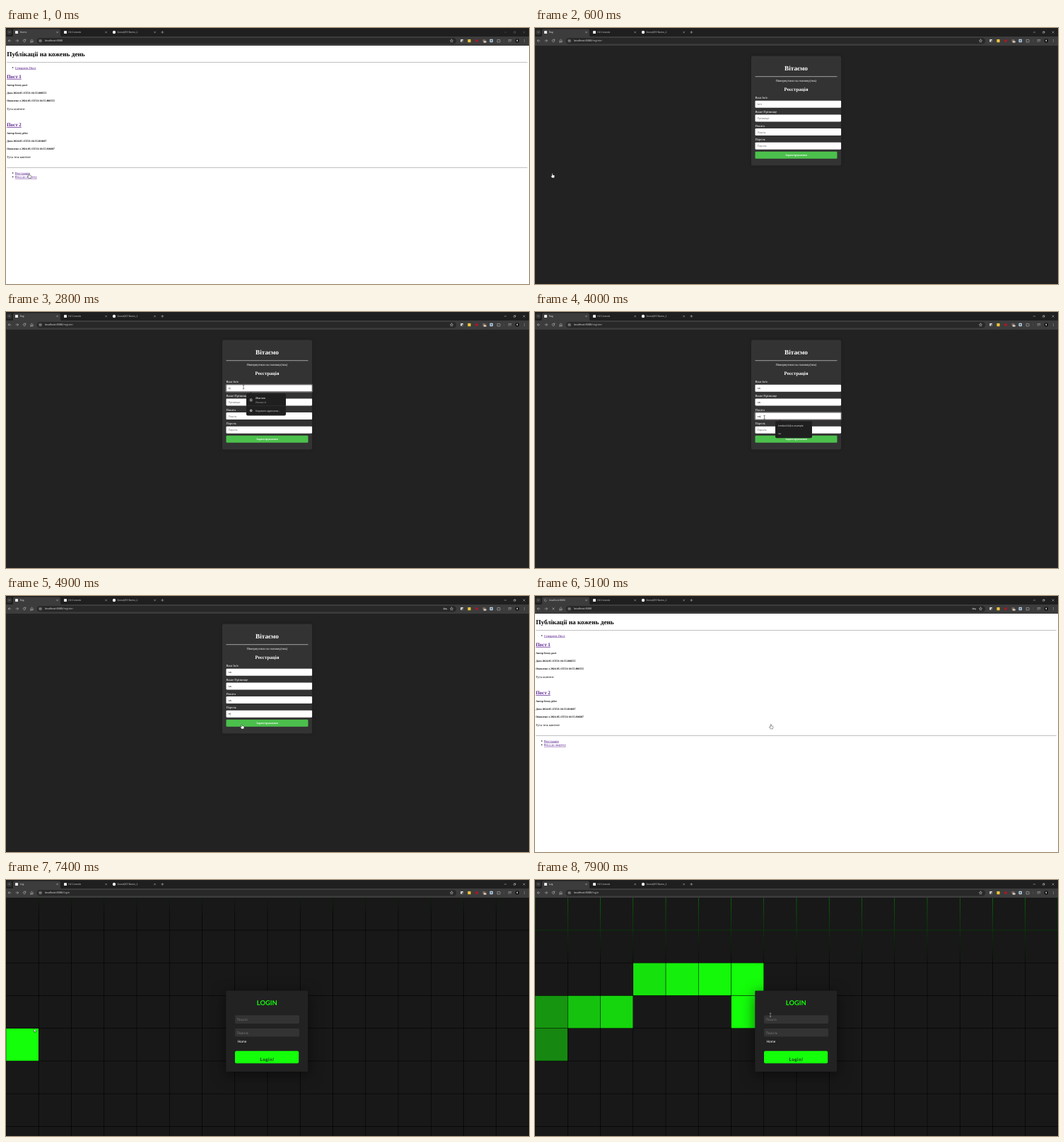
These frames come from a looping animation (740x362 px, 8 s). An HTML page:

```html
<!DOCTYPE html>
<html lang="uk">
<head>
<meta charset="utf-8">
<title>Blog demo</title>
<style>
html, body { margin: 0; width: 100%; height: 100%; overflow: hidden; background: #222; }
svg { display: block; width: 100vw; height: 100vh; text-rendering: geometricPrecision; }
text { white-space: pre; }
.serif { font-family: "Liberation Serif", "Times New Roman", serif; }
.sans { font-family: "Liberation Sans", Arial, sans-serif; }
.ui { font-family: "Open Sans", "Noto Sans", sans-serif; }
.lato { font-family: Lato, "Open Sans", sans-serif; }
.b { font-weight: 700; }
.u { text-decoration: underline; }
.mid { text-anchor: middle; }
.card { filter: drop-shadow(0 4.3px 10px rgba(0, 0, 0, .55)); }
.line { fill: none; stroke-linecap: round; stroke-linejoin: round; }
</style>
</head>
<body>
<svg id="stage" viewBox="0 0 740 362" preserveAspectRatio="none"></svg>
<script>
const LOOP = 8000, STEP = 100, TOP = 25, CELL = 46.25, GAP = 0.58;
const LOGIN_AT = 7200, HOME_AT = 5100, REG_AT = 500;
const GREEN = [20, 255, 10], DARK = [24, 24, 24];
const GREEN_CSS = `rgb(${GREEN})`;

// Markup helpers
const text = (x, y, size, cls, fill, str, more = '') =>
  `<text x="${x}" y="${y}" font-size="${size}" class="${cls}" fill="${fill}" ${more}>${str}</text>`;
const rect = (x, y, w, h, fill, r = 0, more = '') =>
  `<rect x="${x}" y="${y}" width="${w}" height="${h}" rx="${r}" fill="${fill}" ${more}/>`;
const dot = (x, y, r, fill, more = '') => `<circle cx="${x}" cy="${y}" r="${r}" fill="${fill}" ${more}/>`;
const line = (d, color = '#ccc', w = 0.5, more = '') =>
  `<path class="line" d="${d}" stroke="${color}" stroke-width="${w}" ${more}/>`;
const group = (id, body, more = '') => `<g id="${id}" ${more}>${body}</g>`;
const cross = (x, y, r, color, w) =>
  line(`M${x - r} ${y - r}l${2 * r} ${2 * r}m0 ${-2 * r}l${-2 * r} ${2 * r}`, color, w);

function post(y, title, author, stamp, body) {
  const small = (dy, s) => text(1.2, y + dy, 3.84, 'serif b', '#000', s);
  return text(1.2, y, 6.94, 'serif b u', '#551a8b', title)
    + small(11.2, `Автор блогу ${author}`)
    + small(22.2, `Дата ${stamp}`)
    + small(33.1, `Оновлено о ${stamp}`)
    + text(1.2, y + 44.7, 4.625, 'serif', '#000', body);
}

function homePage() {
  const item = (y, s) => dot(9.6, y - 1.5, 0.75, '#000') + text(12.8, y, 4.625, 'serif u', '#551a8b', s);
  const rule = y => rect(1.2, y, 736.5, 0.55, '#8c8c8c');
  return rect(0, TOP, 740, 337, '#fff')
    + text(1.2, 39.8, 9.25, 'serif b', '#000', 'Публікації на кожень день')
    + rule(48.3) + item(57.6, 'Створити Пост')
    + post(70.9, 'Пост 1', 'poet', '2024-05-15T21:16:55.806555', 'Тута контент')
    + post(139, 'Пост 2', 'pilot', '2024-05-15T21:16:55.816607', 'Тута теж контент')
    + rule(197.2) + item(206.6, 'Реєстрація') + item(211.9, 'Вхід до акаунту');
}

const FIELDS = [
  { y: 102.8, label: "Ваш Ім'я", hint: "Ім'я" },
  { y: 122.4, label: 'Ваше Прізвище', hint: 'Прізвище' },
  { y: 142.1, label: 'Пошта', hint: 'Пошта' },
  { y: 161.7, label: 'Пароль', hint: 'Пароль' }
];

function registerPage() {
  const fields = FIELDS.map((f, i) =>
    text(311.5, f.y - 2.6, 4.625, 'serif', '#fff', f.label)
    + rect(311.5, f.y, 121.6, 10, '#fff', 1.1)
    + text(314.4, f.y + 6.4, 3.85, 'sans', '#757575', f.hint, `id="in${i}"`)).join('');
  const ring = rect(310.9, 0, 122.8, 10.8, 'none', 1.4, 'stroke="#d8d0d0" stroke-width=".5"')
    + rect(311.4, 0.5, 121.8, 9.8, 'none', 1.1, 'stroke="#2a2424" stroke-width=".55"');
  return rect(0, TOP, 740, 337, '#222')
    + rect(306, 39.6, 127.2, 155, '#333', 2.3, 'style="filter:drop-shadow(0 0 2px rgba(0,0,0,.2))"')
    + text(369.5, 60, 9.25, 'serif b mid', '#fff', 'Вітаємо')
    + rect(311.5, 68.5, 116, 0.6, '#e4e4e4')
    + text(369.5, 75.5, 4.625, 'serif mid', '#fff', 'Повернутися на головну(тик)')
    + text(369.5, 88.7, 6.94, 'serif b mid', '#fff', 'Реєстрація')
    + fields
    + rect(311.5, 174.8, 116, 10, '#4cc04c', 1.2)
    + text(369.5, 181.2, 4.05, 'serif b mid', '#fff', 'Зареєструватися')
    + group('ring', ring) + group('namePop', namePopup()) + group('mailPop', mailPopup());
}

function popup(y, w, h) {
  return `<path d="M344.6 ${y + 0.2}l2-2 2 2z" fill="#1f1f1f"/>` + rect(340, y, w, h, '#1f1f1f', 2);
}

function namePopup() {
  return popup(115.2, 56, 31.2)
    + dot(346.7, 124.4, 1.7, 'none', 'stroke="#ddd" stroke-width=".55"')
    + dot(346.7, 123.9, 0.6, '#ddd') + line('M345.6 125.5q1.1-.9 2.2 0', '#ddd', 0.5)
    + text(353, 122.9, 3.5, 'ui', '#f2f2f2', 'Zhorven', 'font-weight="600"')
    + text(353, 128.7, 3.2, 'ui', '#c4c4c4', 'Zhorven K')
    + rect(340, 132.6, 56, 0.3, '#484848')
    + dot(346.7, 139.4, 1.4, 'none', 'stroke="#ddd" stroke-width=".9"') + dot(346.7, 139.4, 0.5, '#ddd')
    + text(353, 140.7, 3.4, 'ui', '#dcdcdc', 'Керувати адресами...');
}

function mailPopup() {
  return popup(154.4, 52, 23.8)
    + text(343.8, 162.3, 3.35, 'ui', '#f2f2f2', 'lomiket24@zx.example')
    + text(343.8, 172.8, 3.35, 'ui', '#f2f2f2', 'ча');
}

function loginPage() {
  let cells = '';
  for (let r = 0; r < 8; r++)
    for (let c = 0; c < 16; c++)
      cells += rect(c * CELL + GAP / 2, TOP + r * CELL, CELL - GAP, CELL - GAP, `rgb(${DARK})`, 0, `id="c${c}_${r}"`);
  const input = (y, hint) => rect(324, y, 91, 11.6, '#333', 1.6) + text(326.6, y + 7.5, 4.9, 'lato', '#777', hint);
  const glow = `<linearGradient id="glow" x1="0" y1="0" x2="0" y2="1"><stop offset="0"/>`
    + `<stop offset=".5" stop-color="#0f0"/><stop offset="1"/></linearGradient>`;
  return `<defs>${glow}</defs>` + rect(0, TOP, 740, 337, '#000')
    + rect(0, TOP, 740, 337, 'url(#glow)', 0, 'id="beamRect"') + cells
    + rect(311.3, 156.6, 115.8, 114.4, '#222', 1.2, 'class="card"')
    + text(369.3, 177.4, 9.4, 'lato b mid', GREEN_CSS, 'LOGIN')
    + input(191.3, 'Пошта') + input(210, 'Пароль')
    + text(327.4, 229.7, 4.9, 'lato', '#fff', 'Home')
    + rect(324, 241.8, 90.2, 17.4, GREEN_CSS, 2)
    + text(369.5, 255.6, 6.5, 'lato b mid', '#173317', 'Login!', 'letter-spacing=".4"');
}

function browserBar() {
  const square = x => rect(x - 2, 4, 4, 4, '#e8e8e8', 0.5);
  const close = x => cross(x, 6, 0.9, '#d0d0d0', 0.45);
  const tab = 'M8 12.2q2 0 2-2V3.6q0-2.2 2.2-2.2H74.8q2.2 0 2.2 2.2v6.6q0 2 2 2z';
  const tools = line('M6.8 18H3.4m1.5-1.6L3.3 18l1.6 1.6') + line('M14 18h3.4m-1.5-1.6l1.6 1.6-1.6 1.6')
    + group('reload', line('M27.6 17a1.8 1.8 0 1 0 .2 1.5m0-2.6v1.4h-1.4')) + group('stop', cross(26, 18, 1.3, '#ccc', 0.5))
    + line('M34.8 20v-2.4l1.7-1.4 1.7 1.4V20h-1.2v-1.4h-1V20z');
  const address = rect(43.6, 13.9, 593.6, 8.6, '#282828', 4.3)
    + dot(48.6, 18.1, 2.7, '#484848') + line('M47.3 17.3h1.3m1 0h.3m-2.6 1.6h.3m1 0h1.3', '#ddd', 0.5)
    + `<text x="54.8" y="19.4" font-size="3.78" class="ui" fill="#f0f0f0">localhost:8080<tspan id="path" fill="#c8c8c8"></tspan></text>`
    + group('key', dot(619.9, 18, 1, 'none', 'stroke="#ccc" stroke-width=".6"') + line('M621 18h2.6v1m-1.2-1v.9', '#ccc', 0.6))
    + line('M630.5 15.9l.65 1.45 1.55.15-1.2 1.05.35 1.55-1.35-.8-1.35.8.35-1.55-1.2-1.05 1.55-.15z', '#ddd', 0.45);
  const addons = rect(643.2, 16, 3.8, 3.8, '#d5d8da', 0.6) + rect(645, 17.6, 2.2, 2.2, '#555', 0.4)
    + rect(653.4, 15.9, 4.2, 4.4, '#f0c53a', 0.4)
    + dot(666, 18, 2.1, '#a8182c')
    + rect(674.4, 16, 4, 3, '#75635f', 0.6) + rect(675.6, 18.2, 4, 2.6, '#d8c8bd', 0.6)
    + rect(684.5, 15.8, 4.4, 4.4, '#c3d6ea', 0.8) + dot(686.7, 18, 1.2, '#4a7098')
    + line('M695.5 16.6h1.2q.5-1.3 1 0h1.2v1.2q1.2.5 0 1v1.2h-3.4z', '#ccc', 0.5)
    + rect(704.4, 15.6, 0.3, 4.8, '#5a5a5a')
    + line('M711 16.6h2.4m-2.4 1.3h1.7m-1.7 1.3h1.2m2-2.4v2.4m0-2.4h.8', '#ccc', 0.45)
    + dot(723.3, 18, 2.7, '#111') + rect(722.6, 16.6, 1.4, 2.6, '#ddd', 0.6)
    + [16.4, 18, 19.6].map(y => dot(733.4, y, 0.42, '#ddd')).join('');
  const windowKeys = line('M705.2 6h2.6', '#eee', 0.4) + line('M718.6 5.4h1.9v1.9h-1.9zm.6 0v-.6h1.9v1.9h-.6', '#eee', 0.35)
    + cross(733, 6, 1.2, '#eee', 0.4);
  return rect(0, 0, 740, 12.4, '#1f1f1f') + rect(0, 12, 740, 13, '#3c3c3c')
    + rect(1.2, 2.2, 7, 7.2, '#343434', 2) + line('M3.8 5.5l.9.9.9-.9', '#ddd', 0.5)
    + `<path d="${tab}" fill="#3c3c3c"/>`
    + group('pageIcon', square(15)) + group('loadIcon', line('M16.4 6a1.6 1.6 0 1 1-1.6-1.6', '#bbb', 0.5))
    + text(19.8, 7.3, 3.4, 'ui', '#eee', '', 'id="tabTitle"') + close(72.6)
    + square(84) + text(88.2, 7.3, 3.4, 'ui', '#ddd', 'H2 Console') + close(141.6)
    + dot(153, 6, 2.2, '#f0f0f0') + text(157.2, 7.3, 3.3, 'ui', '#ddd', 'StoneQRT/Demo_2') + close(210.6)
    + line('M219.8 6h3m-1.5-1.5v3', '#ddd', 0.45)
    + group('windowKeys', windowKeys) + tools + address + addons;
}

function pointers() {
  const edge = 'fill="#fff" stroke="#000" stroke-width=".4" stroke-linejoin="round"';
  return group('arrow', `<path d="M0 0V4.9L1.1 3.9 1.9 5.6 2.7 5.2 2 3.6H3.5Z" ${edge}/>`)
    + group('hand', `<path d="M-.6.3Q0-.5.6.3V2.2L2.8 2.7Q3.5 2.9 3.3 3.9L2.7 6.4H-.5L-2.2 3.8Q-2 3 -1.2 3.5L-.6 4Z" ${edge}/>`)
    + group('beam', '<path id="beamLine" class="line" d="M-.9-2.8Q0-2.8 0-2.3V2.3Q0 2.8-.9 2.8M.9-2.8Q0-2.8 0-2.3M0 2.3Q0 2.8.9 2.8" stroke-width=".5"/>');
}

const stage = document.getElementById('stage');
stage.innerHTML = group('home', homePage()) + group('register', registerPage()) + group('login', loginPage())
  + browserBar() + group('pointer', pointers());

const $ = id => document.getElementById(id);
const show = (id, on) => $(id).setAttribute('display', on ? 'inline' : 'none');

// Pointer path: time, x, y
const MOVES = [
  [0, 32.5, 206], [200, 24.5, 205.5], [700, 24.5, 205.5], [1600, 336, 106], [3300, 336, 106],
  [3500, 326, 127], [3700, 326, 127], [3800, 324.5, 149], [4000, 324.5, 149], [4200, 325, 166],
  [4500, 325, 166], [4900, 333.7, 181.5], [5300, 333.7, 181.5], [6200, 8, 151], [7000, 31, 208],
  [7200, 33, 208.5], [7400, 39.5, 210.3]
];
// Run over the grid, moving evenly between points
const SWEEP = [
  [7400, 39.5, 210.3], [7450, 41, 209], [7520, 46, 190], [7620, 92, 178], [7680, 138, 163],
  [7720, 184, 148], [7780, 230, 140], [7840, 277, 141], [7870, 300, 164], [7900, 333, 191]
];
const SHAPES = [[0, 'hand'], [800, 'arrow'], [1500, 'beam'], [4700, 'hand'], [5400, 'arrow'],
  [6900, 'hand'], [7300, 'arrow'], [7900, 'beam']];
// Grid cells in order: column, row, time the pointer leaves
const TRAIL = [[0, 4, 7450], [0, 3, 7490], [1, 3, 7620], [2, 3, 7680], [3, 2, 7720],
  [4, 2, 7780], [5, 2, 7840], [6, 2, 7870], [6, 3, 7900]];
const FADE = 1500;

// Times of focus and of each typed letter
const TYPING = [
  { focus: 1700, keys: [2800, 3300] }, { focus: 3500, keys: [3600, 3700] },
  { focus: 3800, keys: [3900, 4000] }, { focus: 4200, keys: [4400, 4500] }
];

const latest = (list, t) => list.filter(item => item[0] <= t).pop();
const smooth = p => p * p * (3 - 2 * p);

function along(keys, t, ease) {
  const i = keys.findIndex(k => k[0] > t);
  if (i < 0) return keys[keys.length - 1].slice(1);
  const [t0, x0, y0] = keys[i - 1], [t1, x1, y1] = keys[i];
  const p = ease((t - t0) / (t1 - t0));
  return [x0 + (x1 - x0) * p, y0 + (y1 - y0) * p];
}

// Same curve as the CSS keyword "ease"
function cssEase(p) {
  if (p <= 0) return 0;
  if (p >= 1) return 1;
  const bez = (a, b, s) => 3 * a * s * (1 - s) ** 2 + 3 * b * s * s * (1 - s) + s ** 3;
  let lo = 0, hi = 1;
  for (let i = 0; i < 20; i++) {
    const s = (lo + hi) / 2;
    if (bez(0.25, 0.25, s) < p) lo = s; else hi = s;
  }
  return bez(0.1, 1, lo);
}

function drawBar(t, page) {
  const loading = [REG_AT, HOME_AT, LOGIN_AT].includes(t);
  const path = { home: '', register: '/register', login: '/login' }[page];
  const title = { home: 'Home', register: 'Reg', login: 'Log' }[page];
  $('path').textContent = path;
  $('tabTitle').textContent = loading ? 'localhost:8080' + path : title;
  show('pageIcon', !loading);
  show('loadIcon', loading);
  show('reload', !loading);
  show('stop', loading);
  show('key', t >= 4300 && t <= HOME_AT);
  $('windowKeys').setAttribute('opacity', t < REG_AT ? 0.35 : 1);
}

function drawForm(t) {
  const active = TYPING.filter(f => f.focus <= t).length - 1;
  TYPING.forEach((f, i) => {
    const count = f.keys.filter(k => k <= t).length;
    const typed = i === 3 ? '•'.repeat(count) : 'ча'.slice(0, count);
    const caret = i === active ? '|' : '';
    $('in' + i).textContent = count ? typed + caret : FIELDS[i].hint;
    $('in' + i).setAttribute('fill', count ? '#111' : '#757575');
  });
  show('ring', active >= 0 && t < 4900);
  if (active >= 0) $('ring').setAttribute('transform', `translate(0 ${FIELDS[active].y - 0.4})`);
  show('namePop', t >= 1700 && t < 3400);
  show('mailPop', t >= 3800 && t < 4200);
}

function drawGrid(t) {
  const shift = -337 + 674 * (t - LOGIN_AT) / 5000;
  $('beamRect').setAttribute('transform', `translate(0 ${shift})`);
  TRAIL.forEach(([c, r, leave], i) => {
    const enter = i ? TRAIL[i - 1][2] : 7300;
    const k = t < enter ? 1 : cssEase((t - leave) / FADE);
    const rgb = GREEN.map((g, j) => Math.round(g + (DARK[j] - g) * k));
    $(`c${c}_${r}`).setAttribute('fill', `rgb(${rgb})`);
  });
}

function drawPointer(t, page) {
  const [x, y] = t < 7400 ? along(MOVES, t, smooth) : along(SWEEP, t, p => p);
  const shape = latest(SHAPES, t)[1];
  $('pointer').setAttribute('transform', `translate(${x} ${y})`);
  ['arrow', 'hand', 'beam'].forEach(s => show(s, s === shape));
  $('beamLine').setAttribute('stroke', page === 'login' ? '#ccc' : '#222');
}

function draw(ms) {
  const t = Math.floor((ms % LOOP) / STEP) * STEP;
  const page = latest([[0, 'home'], [REG_AT, 'register'], [HOME_AT, 'home'], [LOGIN_AT, 'login']], t)[1];
  ['home', 'register', 'login'].forEach(p => show(p, p === page));
  drawBar(t, page);
  if (page === 'register') drawForm(t);
  if (page === 'login') drawGrid(t);
  drawPointer(t, page);
}

const start = performance.now();
function tick() {
  draw(performance.now() - start);
  requestAnimationFrame(tick);
}
tick();
</script>
</body>
</html>
```
